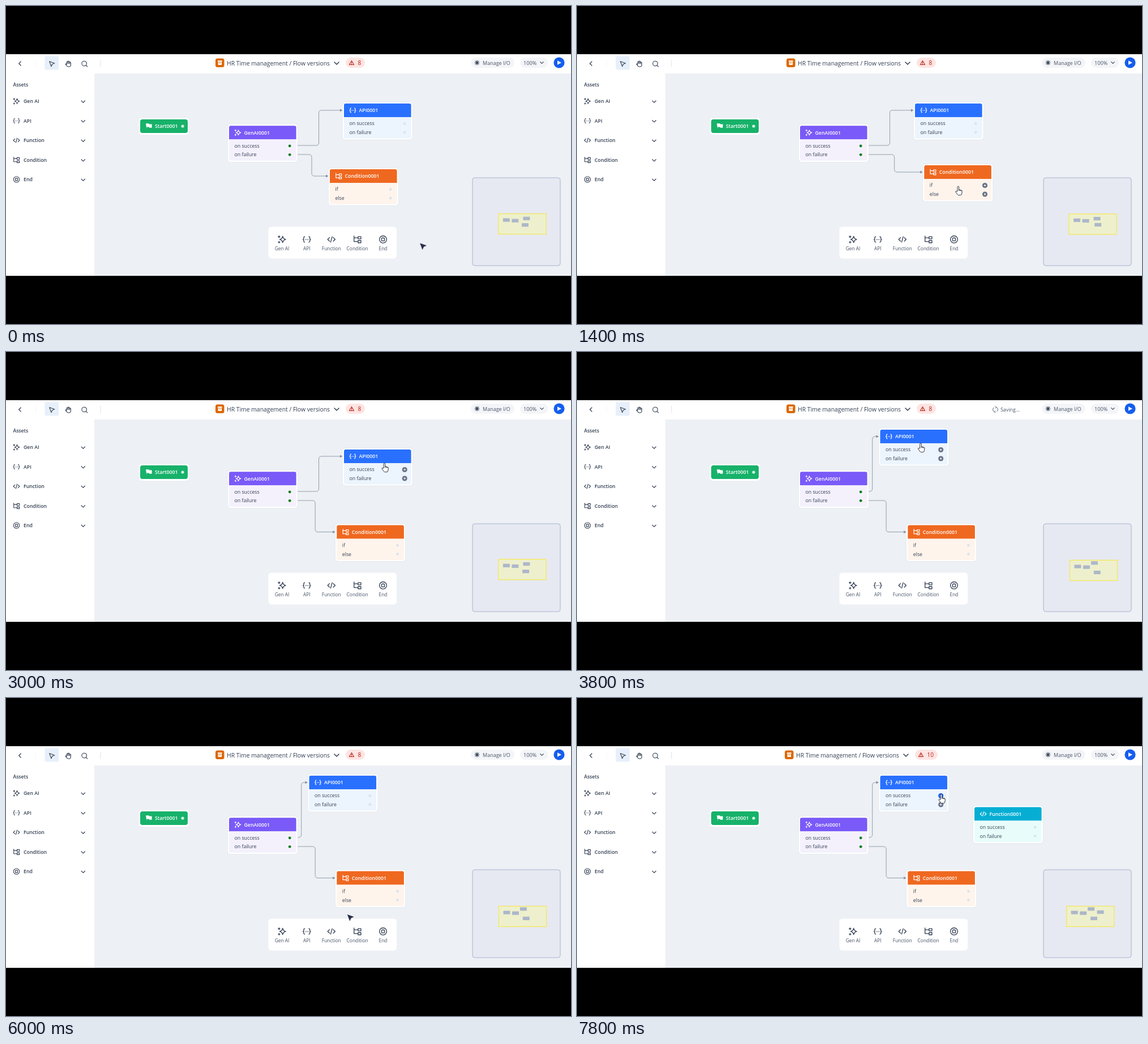
An HTML page that plays this animation: 998 by 561 pixels, repeating every 8000 ms.

```html
<!DOCTYPE html>
<html lang="en">
<head>
<meta charset="utf-8">
<title>Flow editor</title>
<style>
  html, body { margin: 0; width: 100%; height: 100%; overflow: hidden; background: #000; }
  svg { display: block; width: 100%; height: 100%; }
  text { font-family: "Open Sans", "Noto Sans", sans-serif; font-size: 8.75px; fill: #344054; }
  .bold { font-weight: 600; }
  .line { fill: none; stroke: currentColor; stroke-linecap: round; stroke-linejoin: round; }
</style>
</head>
<body>
<svg id="stage" viewBox="0 0 998 561" color="#344054"></svg>
<script>
const LOOP = 8000, STEP = 200;
const stage = document.getElementById('stage');

const icons = {
  genai: '<path d="M1-4.6Q1.7-.7 5.4 0Q1.7.7 1 4.6Q.3.7-3.4 0Q.3-.7 1-4.6ZM-4.2-5.2v2.6M-5.5-3.9h2.6M-4.2 2.8v2.4M-5.4 4h2.4"/>',
  api: '<path d="M-3-4Q-4.6-4-4.4-1.8Q-4.4 0-5.6 0Q-4.4 0-4.4 1.8Q-4.6 4-3 4M3-4Q4.6-4 4.4-1.8Q4.4 0 5.6 0Q4.4 0 4.4 1.8Q4.6 4 3 4M-2 .2h.1M0 .2h.1M2 .2h.1"/>',
  code: '<path d="M-2.7-2.7L-5.4 0L-2.7 2.7M2.7-2.7L5.4 0L2.7 2.7M1.1-4L-1.1 4"/>',
  cond: '<path d="M-4.8-5V3.2H1M-4.8-2.4H1M1-4.1h4.2v3.3H1zM1 1.6h4.2v3.3H1z"/>',
  end: '<circle r="5.2"/><rect x="-2.1" y="-2.1" width="4.2" height="4.2" rx=".7"/>',
  chevron: '<path d="M-3-1.5L0 1.5L3-1.5"/>',
  back: '<path d="M1.7-3.5L-1.8 0L1.7 3.5"/>',
  pointer: '<path d="M-4.3-4.3L4.7-1L.6.7L-1 4.8Z"/>',
  palm: '<path d="M-2.8 1V-3.2q.9-1.2 1.8 0V-.5V-4.2q.9-1.3 1.8 0V-.5V-3.6q.9-1.2 1.8 0V0V-2.2q1-1.1 1.8 0V2Q4.2 5.2.8 5.2Q-1.4 5.2-2.6 3.6L-4.9.7Q-4.6-.7-2.8 1"/>',
  search: '<circle cx="-.5" cy="-.5" r="4.3"/><path d="M2.7 2.7L5 5"/>',
  spokes: '<path d="M0-4V4M-4 0H4M-2.9-2.9L2.9 2.9M2.9-2.9L-2.9 2.9"/>',
  warn: '<path d="M0-3.8L4.3 3.4H-4.3ZM0-1V.8M0 2.2v.1"/>',
  sync: '<path d="M-1.5 4.2A4.4 4.4 0 0 1-2.8-3.4M1.5-4.2A4.4 4.4 0 0 1 2.8 3.4M-.4-5.5L1.6-4.2L.3-2.3M.4 5.5L-1.6 4.2L-.3 2.3"/>'
};

const icon = (name, x, y, scale = 1, color = '#344054', weight = 1.1) =>
  `<g class="line" color="${color}" stroke-width="${weight}" transform="translate(${x} ${y}) scale(${scale})">${icons[name]}</g>`;
const rect = (x, y, w, h, fill, rx = 0, extra = '') =>
  `<rect x="${x}" y="${y}" width="${w}" height="${h}" fill="${fill}" rx="${rx}" ${extra}/>`;
const label = (x, y, text, extra = '') => `<text x="${x}" y="${y}" ${extra}>${text}</text>`;
const style = (size, fill, more = '') => `style="font-size:${size}px;fill:${fill};${more}"`;

const PORT_X = 107.2, PORT_Y = [35.5, 51];

function node(id, title, glyph, head, body, rows) {
  return `<g id="${id}">
    ${rect(-3, -3, 124.5, 67.5, '#dfe4ec', 5, 'opacity=".6"')}
    ${rect(-2.2, -2.2, 123, 65.8, '#fff', 4.5)}
    <path d="M0 24V3Q0 0 3 0H115.6Q118.6 0 118.6 3V24Z" fill="${head}"/>
    <path d="M0 24V58.5Q0 61.5 3 61.5H115.6Q118.6 61.5 118.6 58.5V24Z" fill="${body}"/>
    ${icon(glyph, 15.5, 12, .98, '#fff', 1.2)}
    ${label(26.5, 15.3, title, 'class="bold" style="fill:#fff"')}
    ${label(9.5, 38.4, rows[0])}${label(9.5, 54, rows[1])}
    <g class="ports"></g></g>`;
}

const assets = [['genai', 'Gen AI', 487.5], ['api', 'API', 531.3], ['code', 'Function', 574.8],
  ['cond', 'Condition', 620.6], ['end', 'End', 666]];
const outcome = ['on success', 'on failure'];

stage.innerHTML = `
  ${rect(0, 0, 998, 561, '#000')}
  ${rect(0, 85, 998, 391, '#fff')}
  ${rect(156, 119, 842, 357, '#edf0f4')}
  <g id="edges"></g>
  <g transform="translate(237 200)">
    ${rect(-2.5, -2.5, 89, 29.5, '#fff', 5)}${rect(0, 0, 84, 24, '#17b26a', 4)}
    <path d="M10 7.2H15.4L16 8.6H20.6V14.8H16.2L15.5 13.4H11.6V17.2" fill="#fff"/>
    ${label(26, 15.3, 'Start0001', 'class="bold" style="fill:#fff"')}
    <circle cx="75" cy="12" r="2.6" fill="#d5f2e3"/>
  </g>
  ${node('genai', 'GenAI0001', 'genai', '#7a5af8', '#f4f1fd', outcome)}
  ${node('api', 'API0001', 'api', '#2970ff', '#ecf4fd', outcome)}
  ${node('cond', 'Condition0001', 'cond', '#ef6820', '#fef4ec', ['if', 'else'])}
  ${node('func', 'Function0001', 'code', '#06aed4', '#e8fdfa', outcome)}
  ${rect(463.5, 389.5, 226.5, 56, '#fff', 5)}
  ${assets.map(([glyph, name, x], i) =>
    icon(glyph, x, 411.8, 1.22) + label(x, i === 1 ? 430.6 : 431.3, name, 'text-anchor="middle" ' + style(8.4, '#475467'))).join('')}
  ${rect(824, 303, 155, 155, '#e6e9f1', 4, 'stroke="#a9b2d0"')}
  <g id="map"></g>

  ${icon('back', 24.5, 101.5, 1, '#344054', 1.2)}
  ${rect(52, 95, 1, 12, '#f4f5f7')}
  ${rect(68.5, 88.5, 24.5, 24, '#e7f0fa', 2)}
  ${icon('pointer', 81, 102)}${icon('palm', 110, 102)}${icon('search', 138.7, 102)}
  ${rect(166.5, 95, 1, 12, '#dde1e7')}
  <g id="title">
    ${rect(370, 92.5, 15.5, 15.5, '#dc6803', 3.5)}
    <path d="M374 96.3h7.6v2.2H374zM374.6 99.3h6.4v4.8h-6.4z" fill="#fff"/>
    <path d="M376.6 100.8h2.4" stroke="#dc6803"/>
    ${label(390, 104.5, 'HR Time management / Flow versions', style(10.36, '#344054'))}
    ${icon('chevron', 584, 101, 1.35)}
    <rect id="badge" x="600" y="91" height="18" rx="9" fill="#fee4e2"/>
    ${icon('warn', 610.5, 100.2, .95, '#b42318')}
    <text id="count" x="621.5" y="104" ${style(10, '#b42318')}></text>
  </g>
  <g id="saving">${icon('sync', 739, 101.5, 1, '#475467', .9)}${label(748, 104.5, 'Saving...', style(8.9, '#475467'))}</g>
  ${rect(821, 91, 77, 18, '#f4f5f8', 9)}${icon('spokes', 832, 100, 1, '#344054', 1.2)}
  ${label(842, 103.5, 'Manage I/O', style(9, '#475467'))}
  ${rect(908, 91, 49.5, 18, '#f4f5f8', 9)}${label(914, 103.5, '100%', style(9.2, '#475467'))}
  ${icon('chevron', 946.5, 100, .95)}
  <circle cx="977" cy="100" r="9.6" fill="#155eef"/><path d="M974 96.2L981 100L974 103.8Z" fill="#fff"/>

  ${label(12.5, 141.5, 'Assets', 'class="bold" style="font-size:8.6px"')}
  ${assets.map(([glyph, name], i) => {
    const y = 168 + i * 34.5;
    return icon(glyph, 18.5, y) + label(31, y + 3.2, name, 'class="bold"') + icon('chevron', 136.3, y + .8, 1.05);
  }).join('')}

  <g id="cursor">
    <path id="arrow" d="M.6.2L11.4 4Q12.3 4.6 11.4 5.2L7.2 7.1L5.2 11.6Q4.6 12.4 4 11.6L0 .9Q0 0 .6.2Z" fill="#272e4c" stroke="#fff" stroke-width=".6"/>
    <path id="hand" d="M-1.3 9V1.3a1.3 1.3 0 0 1 2.6 0V6l4.2 1q1.6.5 1.4 2.2l-.6 4q-.3 2.5-2 2.5H.6q-1 0-1.6-1L-4.4 10q-.4-1.6 1-1.4zM1.3 6v2M3.4 6.6v1.8M5.3 7.1v1.6" fill="#fff" stroke="#30343f" stroke-width="1" stroke-linejoin="round"/>
  </g>`;

const $ = id => document.getElementById(id);
const show = (id, on) => $(id).setAttribute('display', on ? 'inline' : 'none');
const clamp = (v, lo, hi) => Math.min(hi, Math.max(lo, v));

// Pointer tip: time, x, y
const path = [[0, 731, 418], [200, 731, 418], [800, 632, 325], [1400, 673.3, 318], [2200, 644.3, 342.5],
  [2400, 644.3, 342.5], [3000, 668.5, 196], [3600, 607, 161], [4200, 607, 161], [5200, 703, 231],
  [5800, 575, 412], [6600, 752, 216.5], [6800, 750, 214.5], [7000, 750, 214.5], [7800, 643.5, 170]];

function pointerAt(t) {
  const i = path.findIndex(k => k[0] > t);
  if (i < 0) return path[path.length - 1].slice(1);
  const [a, b] = [path[i - 1], path[i]];
  const u = (t - a[0]) / (b[0] - a[0]), e = u * u * (3 - 2 * u);
  return [1, 2].map(j => a[j] + (b[j] - a[j]) * e);
}

// A node follows the pointer only while it is being dragged
const drags = {
  api: { from: 3000, to: 3600, grab: [71.5, 24] },
  cond: { from: 800, to: 2200, grab: [60, 37] },
  func: { from: 6000, to: 6800, grab: [48, 22] }
};
const within = ([px, py], [x, y], w, h) => px > x && px < x + w && py > y && py < y + h;

function portMarks(id, pos, pointer, hovered) {
  return PORT_Y.map(y => {
    const at = `cx="${PORT_X}" cy="${y}"`;
    if (id === 'genai') return `<circle ${at} r="2.4" fill="#087d12"/>`;
    if (!hovered) return `<circle ${at} r="2.4" fill="#dde3ee"/>`;
    const near = Math.hypot(pointer[0] - pos[0] - PORT_X, pointer[1] - pos[1] - y) < 5;
    return `<circle ${at} r="4.5" fill="${near ? '#155eef' : '#667085'}"/>
      <path d="M${PORT_X - 2} ${y}h4M${PORT_X} ${y - 2}v4" stroke="#fff"/>`;
  }).join('');
}

function edge(y0, [x, y]) {
  const x0 = 511, tip = x - 3, ty = y + 12, mid = (x0 + tip) / 2, r = 5, s = Math.sign(ty - y0);
  return `<path fill="none" stroke="#929eae" d="M${x0} ${y0}H${mid - r}Q${mid} ${y0} ${mid} ${y0 + s * r}
    V${ty - s * r}Q${mid} ${ty} ${mid + r} ${ty}H${tip}"/>
    <path fill="#7d899b" d="M${tip} ${ty}l-4-2.4v4.8z"/>`;
}

function miniMap(nodes) {
  const S = .0987;
  const right = Math.max(...nodes.map(n => n[0])) + 119;
  const top = Math.min(...nodes.map(n => n[1]));
  const bottom = Math.max(...nodes.map(n => n[1])) + 62;
  const mx = x => 901.5 + (x - (237 + right) / 2) * S;
  const my = y => 380.5 + (y - (top + bottom) / 2) * S;
  return rect(mx(156), my(119), 84, 36, '#eef0cd', 0, 'stroke="#f4e75a" stroke-width="1.3"') +
    [[237, 200], ...nodes].map(([x, y]) => rect(mx(x), my(y), 12, 6.2, '#adb7c9')).join('');
}

function draw(t) {
  const pointer = pointerAt(t);
  const pos = { genai: [394, 211.3] };
  for (const [id, { from, to, grab }] of Object.entries(drags))
    pos[id] = pointerAt(clamp(t, from, to)).map((v, i) => v - grab[i]);
  if (t < 800) pos.cond = [572, 288];

  const added = t >= 6200;
  if (!added) delete pos.func;
  show('func', added);

  let overNode = false;
  for (const id in pos) {
    const hovered = within(pointer, pos[id], 119, 62);
    overNode = overNode || hovered;
    $(id).setAttribute('transform', `translate(${pos[id]})`);
    $(id).querySelector('.ports').innerHTML = portMarks(id, pos[id], pointer, hovered);
  }
  $('edges').innerHTML = edge(246, pos.api) + edge(262, pos.cond);
  $('map').innerHTML = miniMap(Object.values(pos));

  $('title').setAttribute('transform', `translate(${added ? -3 : 0} 0)`);
  $('badge').setAttribute('width', added ? 40 : 34);
  $('count').textContent = added ? '10' : '8';
  show('saving', (t >= 2400 && t < 3000) || (t >= 3600 && t < 5600) || (t >= 7000 && t < 7600));

  const hand = overNode || within(pointer, [464, 390], 226, 55);
  show('hand', hand);
  show('arrow', !hand);
  $('cursor').setAttribute('transform', `translate(${pointer})`);
}

const start = performance.now();
function tick(now) {
  const t = Math.max(0, now - start) % LOOP;
  draw(Math.floor(t / STEP) * STEP);
  requestAnimationFrame(tick);
}
draw(0);
requestAnimationFrame(tick);
</script>
</body>
</html>
```
